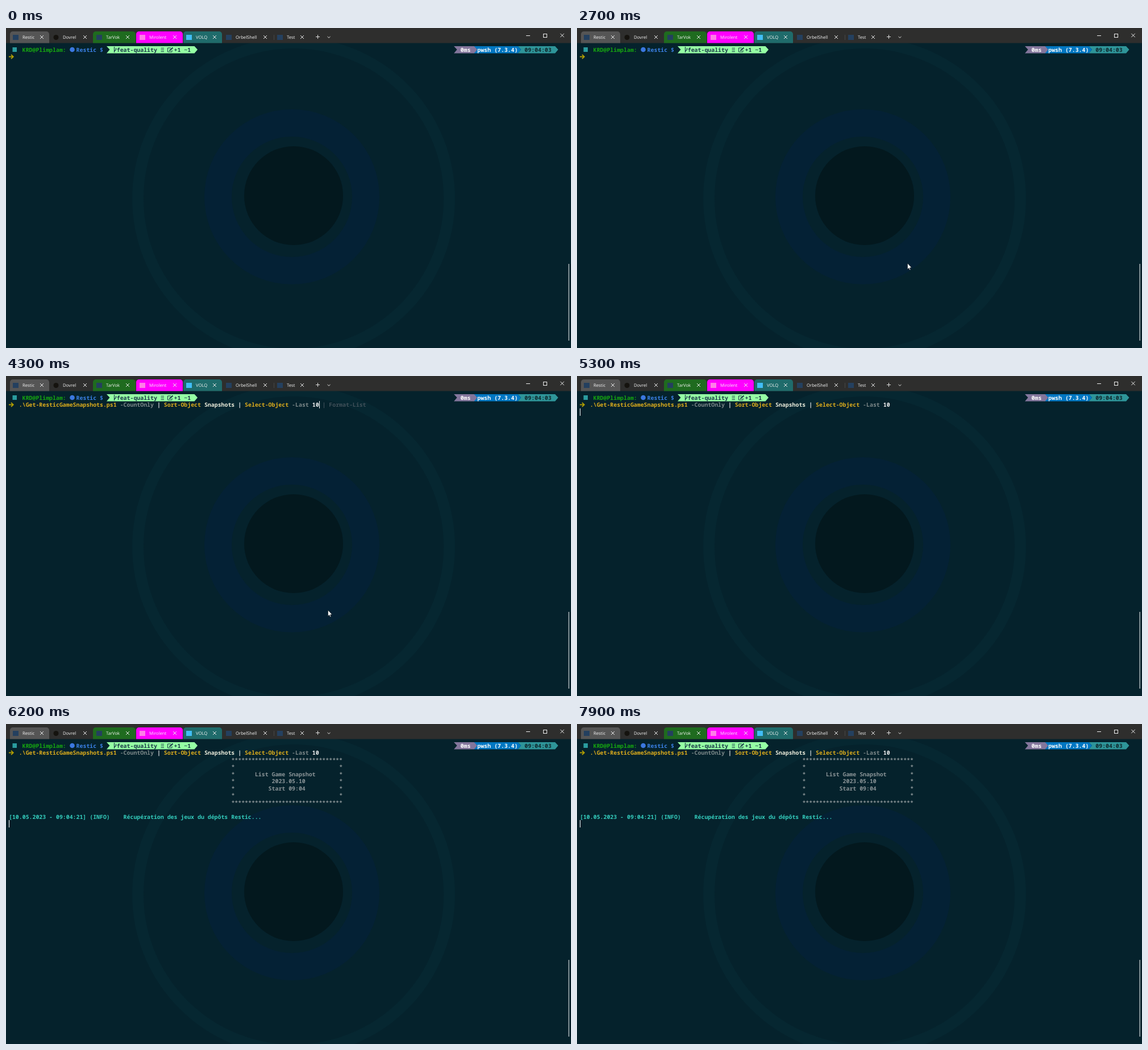
Animation, 994 px wide and 563 px high, one loop 8 s. Source, as an HTML page with a canvas:

```html
<!DOCTYPE html>
<html lang="en">
<head>
<meta charset="utf-8">
<title>Terminal session</title>
<style>
html, body { margin: 0; width: 100%; height: 100%; overflow: hidden; background: #05222c; }
canvas { display: block; width: 994px; height: 563px; }
</style>
</head>
<body>
<canvas id="stage" width="994" height="563"></canvas>
<script>
const LOOP = 8000, CELL = 5.93, LEFT = 5;
const ctx = document.getElementById('stage').getContext('2d');
const MONO = '600 9.88px "Noto Sans Mono", "DejaVu Sans Mono", monospace';
const UI = '500 7.7px "Open Sans", "Noto Sans", sans-serif';

const colX = c => LEFT + c * CELL;
const rowY = r => 38 + r * 12.55;

function text(str, x, y, color, font) {
  ctx.font = font;
  ctx.fillStyle = color;
  ctx.fillText(str, x, y);
}
const mono = (str, col, row, color) => text(str, colX(col), rowY(row) + 3.5, color, MONO);

function rect(x, y, w, h, color) {
  ctx.fillStyle = color;
  ctx.fillRect(x, y, w, h);
}

function disc(x, y, r, color) {
  ctx.fillStyle = color;
  ctx.beginPath();
  ctx.arc(x, y, r, 0, Math.PI * 2);
  ctx.fill();
}

function ring(x, y, r, width, color) {
  ctx.strokeStyle = color;
  ctx.lineWidth = width;
  ctx.beginPath();
  ctx.arc(x, y, r, 0, Math.PI * 2);
  ctx.stroke();
}

function trace(points) {
  ctx.beginPath();
  for (const [x, y] of points) ctx.lineTo(x, y);
}

function line(color, width, ...points) {
  trace(points);
  ctx.strokeStyle = color;
  ctx.lineWidth = width;
  ctx.stroke();
}

function polygon(color, ...points) {
  trace(points);
  ctx.closePath();
  ctx.fillStyle = color;
  ctx.fill();
}

function cross(x, y, r, color) {
  line(color, 1, [x - r, y - r], [x + r, y + r]);
  line(color, 1, [x + r, y - r], [x - r, y + r]);
}

// Prompt segment with an arrow tip and a matching notch
function segment(x, end, color) {
  polygon(color, [x, 32], [end, 32], [end + 5.5, 38], [end, 44.5], [x, 44.5], [x + 5.5, 38]);
}

const tabs = [
  { name: 'Restic', x: 29, close: 63, icon: '#24405f', fill: '#555555', from: 7, to: 76 },
  { name: 'Dovrel', x: 100, close: 139, icon: '#15130f', round: true },
  { name: 'TarVok', x: 176, close: 214, icon: '#24405f', fill: '#1f6b1f', from: 153, to: 228 },
  { name: 'Mirolent', x: 252, close: 297, icon: '#ff7de8', fill: '#ff00ff', from: 229, to: 311 },
  { name: 'VOLQ', x: 334, close: 367, icon: '#41bdf5', fill: '#1f6b6b', from: 312, to: 380 },
  { name: 'OrbelShell', x: 404, close: 456, icon: '#24405f' },
  { name: 'Test', x: 494, close: 521, icon: '#24405f' }
];

function drawTitleBar() {
  rect(0, 0, 994, 26.5, '#2e2e2d');
  for (const tab of tabs) {
    if (tab.fill) {
      ctx.fillStyle = tab.fill;
      ctx.beginPath();
      ctx.roundRect(tab.from, 6, tab.to - tab.from, 20.5, [5, 5, 0, 0]);
      ctx.fill();
    }
    const ix = tab.x - 12;
    if (tab.round) disc(ix, 16.5, 4.5, tab.icon);
    else rect(ix - 5, 12, 10, 9, tab.icon);
    text(tab.name, tab.x, 19.3, '#f5f5f5', UI);
    cross(tab.close, 16, 3, '#e8e8e8');
  }
  line('#484848', 1, [471.5, 12], [471.5, 21]);
  line('#dddddd', 1, [545, 15.5], [552, 15.5]);
  line('#dddddd', 1, [548.5, 12], [548.5, 19]);
  line('#dddddd', 1, [565.5, 15], [568, 17.3], [570.5, 15]);
  line('#eeeeee', 1, [915, 13.5], [922, 13.5]);
  ctx.strokeRect(945.5, 10.5, 6, 6);
  cross(978.5, 13, 3.2, '#eeeeee');
}

function drawBackdrop() {
  rect(0, 0, 994, 563, '#05222c');
  ring(506, 300, 274, 20, '#062731');
  ring(503, 297, 130, 48, '#042135');
  disc(506, 295, 87, '#03181e');
  rect(989.5, 415, 1.5, 135, '#a9b4b7');
}

function drawPrompt() {
  rect(11.5, 34, 7.5, 8, '#2a9c9f');
  mono('KRD@Plimplam:', 4, 0, '#16a810');
  disc(116.5, 38, 4.3, '#3b78e0');
  mono('Restic $', 20, 0, '#3b82e8');

  const ink = '#193549';
  segment(177, 331.5, '#95ffa4');
  line(ink, 1.2, [190.5, 33], [190.5, 43]);
  line(ink, 1.2, [190.5, 41], [193.5, 38], [193.5, 35]);
  mono('feat-quality', 32, 0, ink);
  for (const y of [35.5, 38.5, 41.5]) line(ink, 1, [272.5, y], [278, y]);
  line(ink, 1, [290, 35], [284.5, 35], [284.5, 42], [292, 42], [292, 39]);
  line(ink, 2, [287.5, 40], [293.5, 34.5]);
  mono('+1 ~1', 49, 0, ink);

  segment(900.5, 966, '#2e9599');
  segment(823, 900.5, '#0077c2');
  segment(788, 823.5, '#83769c');
  mono('0ms', 134, 0, '#ffffff');
  mono('pwsh (7.3.4)', 139, 0, '#ffffff');
  mono('09:04:03', 153, 0, '#10262c');

  line('#b5a000', 1.8, [5, 50.5], [12, 50.5]);
  line('#b5a000', 1.8, [9, 46.8], [12.8, 50.5], [9, 54.2]);
}

const command = [
  ['.\\Get-ResticGameSnapshots.ps1', 3, '#dfae1c'],
  ['-CountOnly', 33, '#7d8889'],
  ['|', 44, '#f2f2f2'],
  ['Sort-Object', 46, '#dfae1c'],
  ['Snapshots', 58, '#eeeedd'],
  ['|', 68, '#f2f2f2'],
  ['Select-Object', 70, '#dfae1c'],
  ['-Last', 84, '#7d8889'],
  ['10', 90, '#f2f2f2']
];

function drawBanner(closed) {
  const gray = '#8a9497', stars = '*'.repeat(33);
  mono(stars, 66, 2, gray);
  for (let row = 3; row < 8; row++) {
    mono('*', 66, row, gray);
    mono('*', 98, row, gray);
  }
  mono('List Game Snapshot', 73, 4, gray);
  mono('2023.05.10', 78, 5, gray);
  mono('Start 09:04', 77, 6, gray);
  if (closed) mono(stars, 66, 8, gray);
}

function drawInfo() {
  const teal = '#34cdbd';
  mono('[10.05.2023 - 09:04:21] (INFO)', 0, 10, teal);
  mono('Récupération des jeux du dépôts Restic...', 34, 10, teal);
}

// Caret states: start, end, column, row
const carets = [
  [3500, 4300, 3, 1],
  [4300, 4900, 92, 1],
  [5300, 5700, 0, 2],
  [5700, 6000, 0, 8],
  [6000, 6600, 0, 11],
  [7100, 7600, 0, 11],
  [7900, 8000, 0, 11]
];

function drawCaret(t) {
  const now = carets.find(([from, to]) => t >= from && t < to);
  if (now) rect(Math.round(colX(now[2])), Math.round(44 + 12.5 * (now[3] - 1)), 1, 13, '#ffffff');
}

function drawPointer(t) {
  if (t < 2300 || t >= 5300) return;
  const rest = 1 - Math.min(1, (t - 2300) / 800);
  ctx.save();
  ctx.translate(Math.round(566 + 420 * rest ** 4.8), Math.round(412 + 60 * rest ** 4.8));
  const shape = [[0.5, 0], [0.5, 10.5], [2.8, 8.4], [4.3, 12], [5.8, 11.3], [4.4, 8], [7.6, 7.6]];
  polygon('#ffffff', ...shape);
  line('#0a1316', 0.6, ...shape, shape[0]);
  ctx.restore();
}

function draw(t) {
  drawBackdrop();
  drawTitleBar();
  drawPrompt();
  if (t >= 4300) for (const [str, col, color] of command) mono(str, col, 1, color);
  if (t >= 4300 && t < 5300) mono('| Format-List', 93, 1, '#41515a');
  if (t >= 5700) drawBanner(t >= 6000);
  if (t >= 6000) drawInfo();
  drawCaret(t);
  drawPointer(t);
}

ctx.textRendering = 'geometricPrecision';
const start = performance.now();
function tick() {
  const t = (performance.now() - start) % LOOP;
  draw(Math.floor(t / 100) * 100);
  requestAnimationFrame(tick);
}
tick();
</script>
</body>
</html>
```
